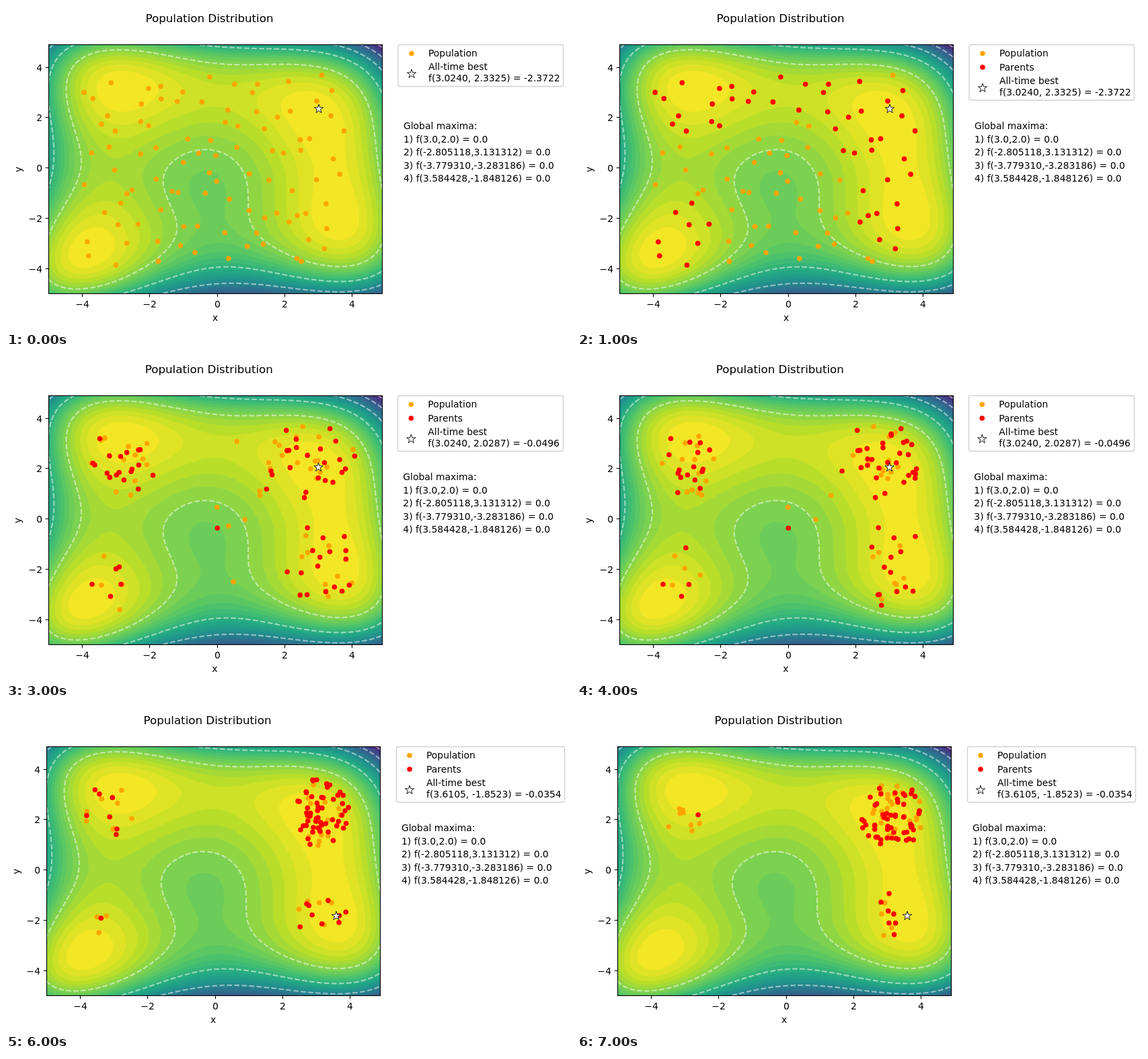
An HTML page with a canvas for the animation above (8 s loop, 840 by 480 pixels).

```html
<!DOCTYPE html>
<html lang="en">
<head>
<meta charset="utf-8">
<title>Population Distribution</title>
<style>
html, body { margin: 0; width: 100%; height: 100%; overflow: hidden; background: #fff; }
canvas { display: block; }
</style>
</head>
<body>
<canvas id="stage" width="840" height="480"></canvas>
<script>
const ctx = document.getElementById('stage').getContext('2d');
const W = 496, H = 370, TOP = 57, LOW = -5, HIGH = 4.9;
const SX = W / (HIGH - LOW), SY = H / (HIGH - LOW);
const toPx = x => (x - LOW) * SX, toPy = y => (HIGH - y) * SY;

// Himmelblau's function and its gradient
const cost = (x, y) => (x * x + y - 11) ** 2 + (x + y * y - 7) ** 2;
const slope = (x, y) => {
  const a = x * x + y - 11, b = x + y * y - 7;
  return [4 * x * a + 2 * b, 2 * a + 4 * y * b];
};

// Viridis in even stops
const viridis = ['#440154', '#482475', '#414487', '#355f8d', '#2a788e', '#21918c',
  '#22a884', '#44bf70', '#7ad151', '#bddf26', '#fde725']
  .map(hex => [1, 3, 5].map(i => parseInt(hex.slice(i, i + 2), 16)));
function colour(t) {
  const p = t * 10, i = Math.min(9, Math.floor(p));
  return viridis[i].map((v, c) => v + (viridis[i + 1][c] - v) * (p - i));
}

// Follow one level line from the edge until it leaves the plot
function traceLine(g, x, y, level) {
  g.beginPath();
  g.moveTo(toPx(x), toPy(y));
  for (let i = 0; i < 3000; i++) {
    let [gx, gy] = slope(x, y);
    const len = Math.hypot(gx, gy);
    x -= gy / len * 0.02;
    y += gx / len * 0.02;
    [gx, gy] = slope(x, y);
    const fix = (cost(x, y) - level) / (gx * gx + gy * gy);
    x -= gx * fix;
    y -= gy * fix;
    g.lineTo(toPx(x), toPy(y));
    if (x < LOW || x > HIGH || y < LOW || y > HIGH) break;
  }
  g.stroke();
}

function makeField() {
  const field = document.createElement('canvas');
  field.width = W;
  field.height = H;
  const g = field.getContext('2d'), image = g.createImageData(W, H);
  const STEP = 25, BANDS = 33, SUB = 3;
  const bands = Array.from({ length: BANDS }, (_, k) => colour(1 - (k + 0.5) / BANDS));
  for (let j = 0, o = 0; j < H; j++) for (let i = 0; i < W; i++, o += 4) {
    const sum = [0, 0, 0];
    for (let s = 0; s < SUB * SUB; s++) {
      const x = LOW + (i + (s % SUB + 0.5) / SUB) / SX;
      const y = HIGH - (j + (Math.floor(s / SUB) + 0.5) / SUB) / SY;
      const band = bands[Math.min(BANDS - 1, Math.floor(cost(x, y) / STEP))];
      for (let c = 0; c < 3; c++) sum[c] += band[c];
    }
    image.data.set([...sum.map(v => v / SUB / SUB), 255], o);
  }
  g.putImageData(image, 0, 0);

  g.strokeStyle = 'rgba(255,255,255,.5)';
  g.lineWidth = 2.08;
  g.setLineDash([7.7, 3.33]);
  const corners = [[LOW, LOW], [HIGH, LOW], [HIGH, HIGH], [LOW, HIGH]], N = 1000;
  for (let level = 150; level < 800; level += 150) {
    corners.forEach(([x0, y0], side) => {
      const [x1, y1] = corners[(side + 1) % 4];
      const at = k => [x0 + (x1 - x0) * k / N, y0 + (y1 - y0) * k / N];
      for (let k = 0; k < N; k++) {
        if (cost(...at(k)) < level && cost(...at(k + 1)) >= level) traceLine(g, ...at(k + 0.5), level);
      }
    });
  }
  return field;
}

let seed = 4242;
const random = () => (seed = seed * 16807 % 2147483647) / 2147483647;

function scatter(x, y, rx, ry, count) {
  return Array.from({ length: count }, () => {
    const a = random() * 2 * Math.PI, r = random() ** 0.6;
    return [x + rx * r * Math.cos(a), y + ry * r * Math.sin(a)];
  });
}

// Each crowd: x, y, radius x, radius y, population count, parent count
const generation = (...crowds) => ({
  population: crowds.flatMap(([x, y, rx, ry, n]) => scatter(x, y, rx, ry, n)),
  parents: crowds.flatMap(([x, y, rx, ry, , n]) => scatter(x, y, rx, ry, n))
});

// The first population is spread evenly: one dot somewhere in each cell
const start = Array.from({ length: 96 }, (_, i) =>
  [115 + (i % 12 + random()) * 32.3, 92 + (Math.floor(i / 12) + random()) * 37]);
const fit = ([x, y]) => cost((x - 63) / SX + LOW, HIGH - (y - TOP) / SY) < 90;

const second = generation([180, 148, 48, 42, 2, 15], [132, 215, 22, 65, 9, 4], [160, 342, 38, 38, 2, 9],
  [345, 200, 80, 115, 9, 4], [445, 145, 62, 52, 7, 20], [450, 312, 60, 65, 11, 18]);
const third = generation([172, 158, 50, 50, 12, 18], [150, 345, 35, 55, 4, 5],
  [335, 220, 55, 115, 7, 2], [455, 155, 66, 58, 16, 22], [470, 310, 54, 62, 8, 17]);
const fifth = generation([168, 160, 36, 50, 14, 13], [165, 300, 24, 46, 4, 4],
  [466, 160, 42, 50, 9, 40], [462, 315, 30, 58, 6, 10]);
const sixth = generation([155, 150, 44, 40, 8, 7], [145, 318, 40, 18, 3, 1],
  [468, 155, 42, 52, 15, 54], [465, 303, 42, 34, 5, 9]);
const seventh = generation([158, 168, 28, 40, 8, 1], [469, 160, 50, 48, 26, 54], [467, 302, 35, 40, 4, 7]);

const alternate = (a, b) => [...a.filter((_, i) => i % 2), ...b.filter((_, i) => i % 2 === 0)];
const fourth = {
  population: alternate(third.population, fifth.population),
  parents: alternate(third.parents, fifth.parents)
};

const layouts = [
  { left: 63, shift: 0, box: [583, 828.5], star: [465, 153], best: 'f(3.0240, 2.3325) = -2.3722' },
  { left: 63, shift: -0.7, box: [582.5, 828.5], star: [464.5, 164], best: 'f(3.0240, 2.0287) = -0.0496' },
  { left: 60, shift: -3, box: [580.5, 830.5], star: [491, 309], best: 'f(3.6105, -1.8523) = -0.0354' }
];
const scenes = [
  { ...layouts[0], population: start },
  { ...layouts[0], population: start, parents: start.filter(fit) },
  { ...layouts[1], ...second },
  { ...layouts[1], ...third },
  { ...layouts[1], ...fourth },
  { ...layouts[1], ...fifth },
  { ...layouts[2], ...sixth },
  { ...layouts[2], ...seventh }
];

function text(string, x, y, align = 'left', size = 13.89) {
  ctx.font = size + 'px "DejaVu Sans", sans-serif';
  ctx.textAlign = align;
  ctx.fillStyle = '#000';
  ctx.fillText(string, x, y);
}

function dot([x, y], fill) {
  ctx.beginPath();
  ctx.arc(x, y, 3.8, 0, 2 * Math.PI);
  ctx.fillStyle = fill;
  ctx.fill();
}

function star(x, y) {
  ctx.beginPath();
  for (let i = 0; i < 10; i++) {
    const a = i * Math.PI / 5, r = i % 2 ? 2.65 : 6.95;
    ctx.lineTo(x + r * Math.sin(a), y - r * Math.cos(a));
  }
  ctx.closePath();
  ctx.fillStyle = '#fff';
  ctx.fill();
  ctx.strokeStyle = '#000';
  ctx.lineWidth = 0.9;
  ctx.stroke();
}

function drawAxes(left, shift) {
  ctx.strokeStyle = '#000';
  ctx.lineWidth = 1.11;
  ctx.strokeRect(left + 0.5, TOP + 0.5, W, H);
  ctx.beginPath();
  for (let v = -4; v <= 4; v += 2) {
    const x = Math.round(left + toPx(v)) + 0.5, y = Math.round(TOP + toPy(v)) + 0.5;
    const label = String(v).replace('-', '\u2212');
    ctx.moveTo(x, TOP + H + 0.5);
    ctx.lineTo(x, TOP + H + 5.4);
    ctx.moveTo(left + 0.5, y);
    ctx.lineTo(left - 4.4, y);
    text(label, x, 448, 'center');
    text(label, left - 9, y + 5, 'right');
  }
  ctx.stroke();
  text('x', 311 + shift, 468, 'center');
  ctx.save();
  ctx.translate(23 + shift, 243);
  ctx.rotate(-Math.PI / 2);
  text('y', 0, 0, 'center');
  ctx.restore();
}

function drawLegend({ box, shift, best, parents }) {
  const x = 603 + shift, textX = 628 + shift, starY = parents ? 122 : 101;
  ctx.beginPath();
  ctx.roundRect(box[0], 57.5, box[1] - box[0], parents ? 82.5 : 62, 2.8);
  ctx.strokeStyle = '#d2d2d2';
  ctx.lineWidth = 1.39;
  ctx.stroke();
  dot([x, 70.5], 'orange');
  text('Population', textX, 75);
  if (parents) {
    dot([x, 91], 'red');
    text('Parents', textX, 96);
  }
  star(x, starY);
  text('All-time best', textX, starY - 6);
  text(best, textX, starY + 11);
  ['Global maxima:', '1) f(3.0,2.0) = 0.0', '2) f(-2.805118,3.131312) = 0.0',
    '3) f(-3.779310,-3.283186) = 0.0', '4) f(3.584428,-1.848126) = 0.0']
    .forEach((line, i) => text(line, 591 + shift, Math.round(183.3 + i * 19.45)));
}

const field = makeField();

function draw(scene) {
  ctx.fillStyle = '#fff';
  ctx.fillRect(0, 0, 840, 480);
  text('Population Distribution', 302.5 + scene.shift, 24, 'center', 16.67);
  ctx.drawImage(field, scene.left, TOP);
  scene.population.forEach(p => dot(p, 'orange'));
  (scene.parents || []).forEach(p => dot(p, 'red'));
  star(...scene.star);
  drawAxes(scene.left, scene.shift);
  drawLegend(scene);
}

let shown = -1;
function tick() {
  const index = Math.floor(performance.now() % 8000 / 1000);
  if (index !== shown) draw(scenes[shown = index]);
  requestAnimationFrame(tick);
}
tick();
</script>
</body>
</html>
```
